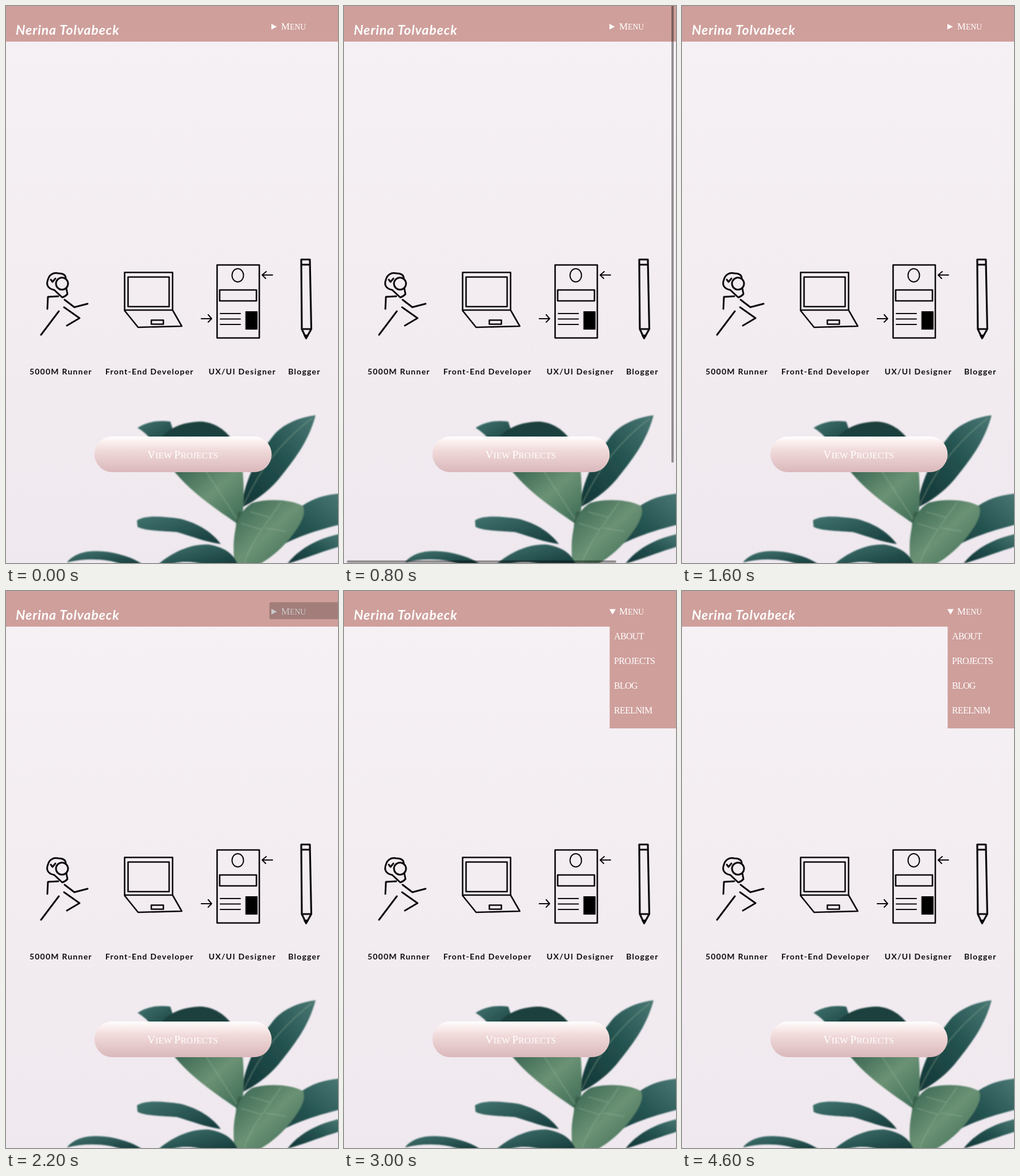
An HTML page for the animation above (4800 ms loop, 578x969 px).

```html
<!DOCTYPE html>
<html lang="en">
<head>
<meta charset="utf-8">
<title>Portfolio</title>
<style>
  html, body { margin: 0; width: 100%; height: 100%; overflow: hidden; background: #f4eff4; }
  svg { display: block; width: 578px; height: 969px; }
  .serif { font: 16px "Liberation Serif", serif; letter-spacing: -.65px; fill: #fff; }
  .caps { font: 13.6px "Liberation Serif", serif; fill: #fff; }
  .caps tspan { font-size: 1.25em; }
  .brand { font: italic bold 23px Lato, sans-serif; letter-spacing: .9px; fill: #fff; }
  .label { font: bold 14px Lato, sans-serif; letter-spacing: 1.25px; text-anchor: middle; fill: #0c0a0c; }
  .icons { fill: none; stroke: #0c0a0c; stroke-width: 2.6; stroke-linecap: round; stroke-linejoin: round; }
  .vein { fill: none; stroke: #a3bda0; stroke-opacity: .4; stroke-width: 1.5; }
</style>
</head>
<body>
<svg viewBox="0 0 578 969">
  <defs>
    <linearGradient id="wall" x2="0" y2="1">
      <stop stop-color="#f6f1f5"/><stop offset=".65" stop-color="#f2ecf1"/><stop offset="1" stop-color="#efe9ef"/>
    </linearGradient>
    <linearGradient id="pill" x2="0" y2="1">
      <stop stop-color="#fff"/><stop offset=".14" stop-color="#fbf0ef"/>
      <stop offset=".4" stop-color="#f0d9d9"/><stop offset="1" stop-color="#dab8bb"/>
    </linearGradient>
    <linearGradient id="dark" x1="1" x2="0" y2="1">
      <stop stop-color="#4a7874"/><stop offset=".45" stop-color="#245350"/><stop offset="1" stop-color="#123536"/>
    </linearGradient>
    <linearGradient id="teal" x2="1" y2="1">
      <stop stop-color="#41736e"/><stop offset="1" stop-color="#143a3a"/>
    </linearGradient>
    <linearGradient id="light" x2="1" y2="1">
      <stop stop-color="#34614f"/><stop offset=".5" stop-color="#6b9274"/><stop offset="1" stop-color="#396753"/>
    </linearGradient>
    <filter id="soft"><feGaussianBlur stdDeviation=".8"/></filter>
  </defs>

  <rect width="578" height="969" fill="url(#wall)"/>

  <g filter="url(#soft)">
    <path fill="url(#teal)" d="M229 734C243 724 264 720 286 723L300 765H262C250 750 240 740 229 734Z"/>
    <path fill="#1d3f3d" d="M271 750C288 730 315 723 342 723C366 726 381 738 392 752L410 812H296Z"/>
    <path fill="url(#dark)" d="M539 712C505 716 476 731 462 752C436 785 412 835 411 872C432 862 455 846 474 824C501 790 526 760 539 712Z"/>
    <path class="vein" stroke-opacity=".25" d="M533 717Q455 775 414 868"/>
    <path fill="url(#light)" d="M290 806C305 825 321 840 342 857C365 875 390 892 409 905C414 880 416 840 411 800Z"/>
    <path class="vein" d="M345 805Q375 850 408 902"/>
    <path fill="url(#dark)" d="M582 848C550 851 527 859 505 878L440 967C470 937 520 917 582 902Z"/>
    <path fill="url(#dark)" d="M582 918C545 926 512 942 490 970C520 962 552 948 582 940Z"/>
    <path fill="none" stroke="#3b604a" stroke-width="8" d="M408 880Q400 920 403 972"/>
    <path fill="url(#light)" d="M398 972C392 920 402 878 430 864C460 856 498 859 517 870C523 883 513 901 501 917C484 941 464 958 440 972Z"/>
    <path class="vein" d="M479 863C460 893 430 925 414 970M461 890L425 880M446 911L409 900M450 908L488 914"/>
    <path fill="url(#teal)" d="M228 895C242 885 275 888 303 892C336 900 360 917 374 936C350 933 324 923 297 915C270 913 241 913 229 906Z"/>
    <path fill="url(#teal)" d="M106 968C122 948 152 945 185 951C210 956 226 963 239 972H205C175 961 140 960 106 968Z"/>
    <path fill="url(#teal)" d="M264 972C290 950 322 935 354 937C383 942 397 955 404 972H345C325 965 300 966 285 972Z"/>
  </g>

  <rect x="154" y="749" width="308.500" height="62" rx="31" fill="url(#pill)"/>
  <text class="caps" x="246" y="787" style="font-size:15.5px"><tspan>V</tspan>IEW <tspan>P</tspan>ROJECTS</text>

  <g class="icons">
    <g stroke-width="3">
      <path d="M104 474C104 467 98 465 91 465C82 463 75 468 73 476C69 486 74 492 84 494L98 507Q104 505 107 501L105 491M78 476L81 480L86 474"/>
      <circle cx="97.500" cy="483" r="10.500"/>
      <path d="M91 505L73 506L72 527M102 511L119 524L142 518M92 531L61 572M101 524L128 543L106 556"/>
    </g>
    <path d="M206.500 463.500H290V529H206.500ZM212.500 471.500H284V523H212.500ZM206.500 530L230 559L306 557L290 529M253 546.500H274V553.500H253Z"/>
    <path d="M367.500 450.500H441V577.500H367.500ZM372 494H436V513H372Z"/>
    <ellipse cx="403.500" cy="468.500" rx="10" ry="11.500" stroke-width="2"/>
    <path stroke-width="2" d="M373 535H408M373 544.500H408M373 554H408M464 468H446M453 462L446 468L452 474M340 544H358M352 537L358 544L352 550"/>
    <path fill="#000" stroke-width="1" d="M417.500 531.500H437.500V562.500H417.500Z"/>
    <path stroke-width="3.200" d="M514 441H529L531.500 562H515ZM514 450H529M515 562L522.500 578L531.500 562"/>
    <path fill="#000" d="M519.500 573H525.500L522.500 578Z"/>
  </g>

  <g class="label">
    <text x="95.500" y="641">5000M Runner</text>
    <text x="250" y="641">Front-End Developer</text>
    <text x="411.500" y="641">UX/UI Designer</text>
    <text x="519.500" y="641">Blogger</text>
  </g>

  <rect width="578" height="62" fill="#cf9f9b"/>
  <text class="brand" x="17" y="50">Nerina Tolvabeck</text>
  <g id="list">
    <rect x="462.500" y="61" width="116" height="178" fill="#cf9f9b"/>
    <g class="serif">
      <text x="470" y="83.500">ABOUT</text>
      <text x="470" y="126.500">PROJECTS</text>
      <text x="470" y="169.500">BLOG</text>
      <text x="470" y="213">REELNIM</text>
    </g>
  </g>
  <path id="arrow" fill="#fff"/>
  <text class="caps" x="479" y="41"><tspan>M</tspan>ENU</text>
  <rect id="tap" x="458.500" y="19.500" width="124" height="29.500" rx="3" fill-opacity=".21"/>

  <g id="bars">
    <rect x="570" y="-5" width="4" height="799.500" rx="2"/>
    <rect x="5" y="964.500" width="469" height="4" rx="2"/>
  </g>
</svg>
<script>
  const LOOP = 4800, STEP = 200;
  const barFade = [0, 0, .12, .3, .4, .4, .4, .2];
  const get = id => document.getElementById(id);
  const list = get("list"), arrow = get("arrow"), tap = get("tap"), bars = get("bars");
  const show = (el, on) => el.setAttribute("visibility", on ? "visible" : "hidden");

  function draw() {
    const step = Math.floor(performance.now() % LOOP / STEP);
    const open = step >= 12;
    show(list, open);
    show(tap, step === 11);
    arrow.setAttribute("d", open ? "M462 31.500H473L467.500 41Z" : "M462 31L471.500 36L462 41Z");
    bars.setAttribute("opacity", barFade[step] || 0);
    requestAnimationFrame(draw);
  }
  draw();
</script>
</body>
</html>
```
